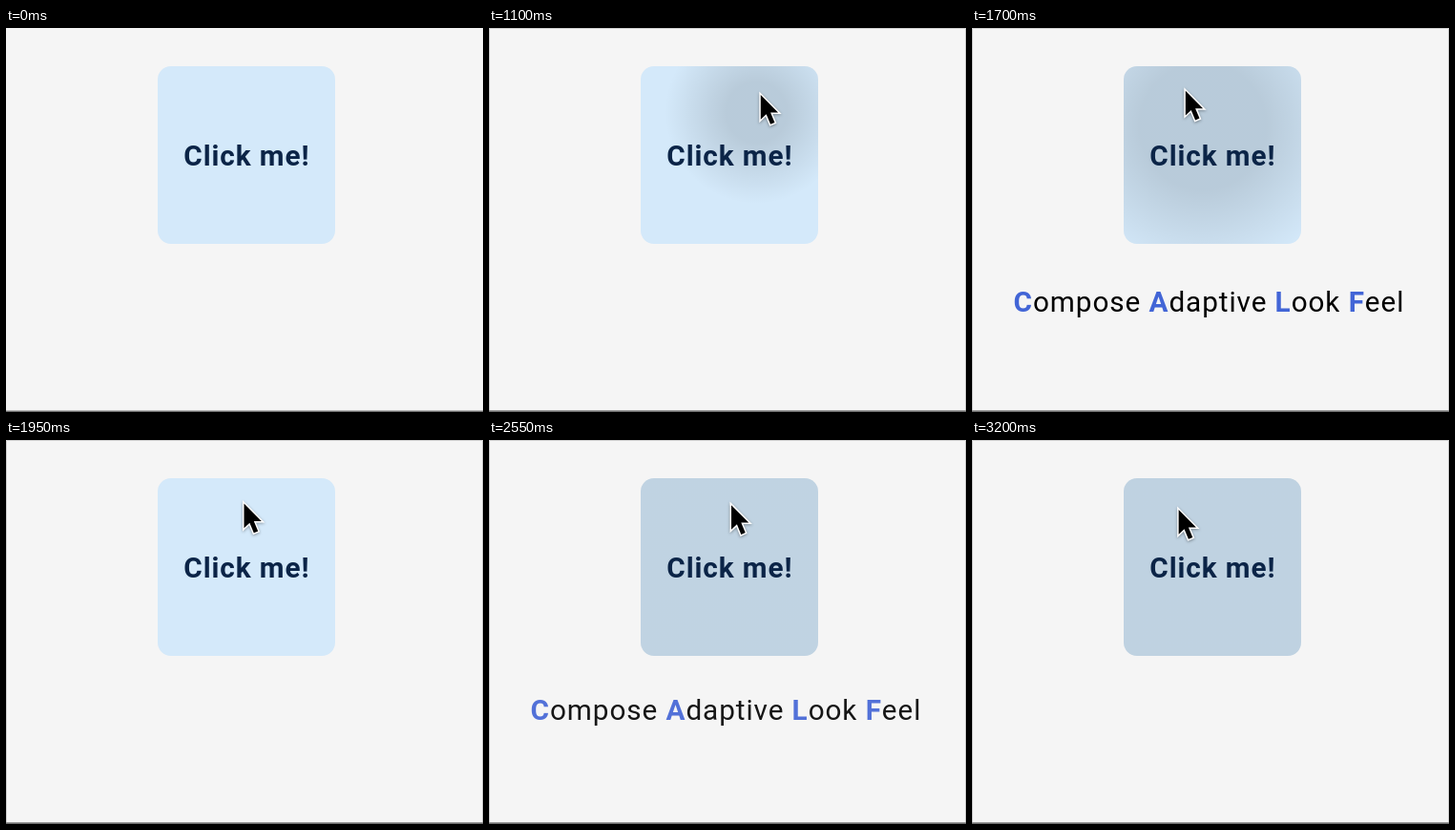
These frames come from a looping animation (500 px wide and 402 px high, 3.25 s). An HTML page:

```html
<!DOCTYPE html>
<html lang="en">
<head>
<meta charset="utf-8">
<title>Click me</title>
<style>
  html, body { margin: 0; width: 100%; height: 100%; overflow: hidden; background: #f5f5f5; }
  svg { display: block; width: 500px; height: 402px; }
  text { font: 400 29.7px Roboto, sans-serif; letter-spacing: .03125em; white-space: pre; }
  .label { font-weight: 700; fill: #0b2447; }
  .b { font-weight: 700; fill: #4265d6; }
  #cursor { filter: drop-shadow(0 1.5px 1.5px rgba(0, 0, 0, .35)); }
</style>
</head>
<body>
<svg viewBox="0 0 500 402">
  <defs>
    <clipPath id="clip"><rect x="159" y="40" width="186" height="186" rx="14"/></clipPath>
    <radialGradient id="ink">
      <stop id="core"/>
      <stop offset="1" stop-opacity="0"/>
    </radialGradient>
  </defs>
  <rect width="500" height="402" fill="#f5f5f5"/>
  <rect y="400" width="500" height="1" fill="#b8b8b8"/>
  <g id="frame">
    <path d="M.5 401V.5H499.5V401" fill="none" stroke="#d2d2d2"/>
    <rect y="400" width="500" height="1" fill="#9a9a9a"/>
  </g>
  <rect y="401" width="500" height="1" fill="#707070"/>
  <rect x="159" y="40" width="186" height="186" rx="14" fill="#d4e9fa"/>
  <g clip-path="url(#clip)"><circle id="ripple" fill="url(#ink)"/></g>
  <text class="label" x="186.3" y="144">Click me!</text>
  <text id="title" x="43.6" y="297"><tspan class="b">C</tspan>ompose <tspan class="b">A</tspan>daptive <tspan class="b">L</tspan>ook <tspan class="b">F</tspan>eel</text>
  <path id="cursor" d="M1.7 3.8v25.6l5.9-5.5 4.4 10.6 4.4-1.9-4.4-10.4h8z" stroke="#fff" stroke-width="3" paint-order="stroke"/>
</svg>
<script>
const LOOP = 3250, STEP = 50, ENTER = 550;
const CENTER = [252, 133], INK = 0.13;

// turning points of the pointer: time, x, y
const TURNS = [
  [ENTER, 496, 110], [900, 293, 67], [1720, 222, 62],
  [2250, 287, 64], [2930, 202, 65], [3400, 223, 72]
];

// press and release times; each release toggles the title
const CLICKS = [[1030, 1090], [1560, 1700], [2280, 2350], [2935, 2955]];

const $ = id => document.getElementById(id);
const clamp = v => Math.max(0, Math.min(1, v));
const lerp = (a, b, k) => a + (b - a) * k;
const sway = k => (1 - Math.cos(Math.PI * k)) / 2;

// critically damped spring, stiffness 400
function spring(ms) {
  const s = ms * 0.02;
  return 1 - (1 + s) * Math.exp(-s);
}

function set(id, attrs) {
  for (const key in attrs) $(id).setAttribute(key, attrs[key]);
}

function pointer(t) {
  const next = Math.max(1, TURNS.findIndex(p => p[0] > t));
  const [t0, x0, y0] = TURNS[next - 1], [t1, x1, y1] = TURNS[next];
  const k = sway(clamp((t - t0) / (t1 - t0)));
  return [lerp(x0, x1, k), lerp(y0, y1, k)];
}

function drawRipple(t) {
  const click = CLICKS.filter(c => c[0] <= t).pop();
  if (!click) return set("ripple", { opacity: 0 });
  const age = t - click[0], p = clamp(age / 260);
  const [x, y] = pointer(click[0]);
  set("core", { offset: 0.3 + 0.4 * p * p });
  set("ripple", {
    cx: lerp(x + 2, CENTER[0], p),
    cy: lerp(y + 5, CENTER[1], p),
    r: 5 + 195 * p * (2 - p),
    opacity: INK * clamp(age / 30) * (1 - clamp((age - 230) / 150))
  });
}

function drawTitle(t) {
  const done = CLICKS.filter(c => c[1] <= t);
  const k = done.length ? spring(t - done.at(-1)[1]) : 0;
  const shown = done.length % 2 ? k : done.length && 1 - k;
  set("title", {
    opacity: shown < 0.06 ? 0 : shown,
    transform: `translate(0 ${-40 * (1 - shown)})`
  });
}

function draw(t) {
  const active = t >= ENTER ? 1 : 0;
  set("frame", { opacity: active });
  set("cursor", { opacity: active, transform: `translate(${pointer(t)})` });
  drawRipple(t);
  drawTitle(t);
}

const start = performance.now();
function tick() {
  const t = (performance.now() - start) % LOOP;
  draw(Math.floor(t / STEP) * STEP);
  requestAnimationFrame(tick);
}
tick();
</script>
</body>
</html>
```
